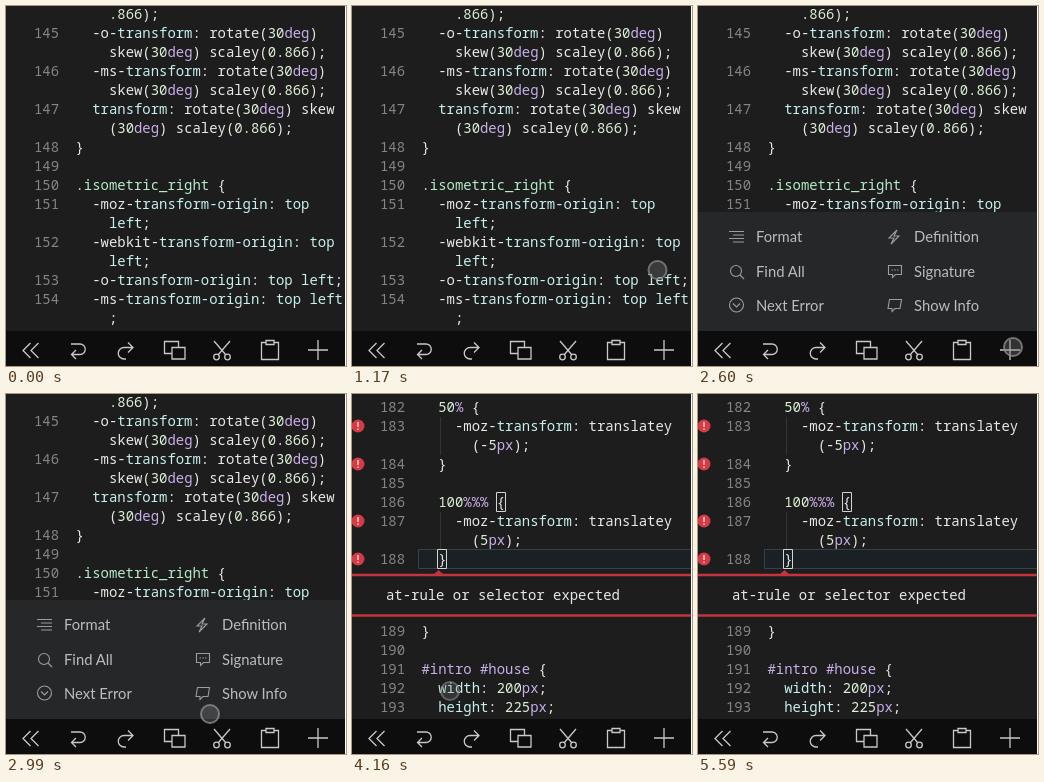
An HTML page that plays this animation: 340 px wide and 360 px high, repeating every 5.72 s.

```html
<!DOCTYPE html>
<html lang="en">
<head>
<meta charset="utf-8">
<title>Mobile code editor</title>
<style>
  html, body { margin: 0; width: 100%; height: 100%; overflow: hidden; background: #fff; }
  svg { display: block; }
  text { white-space: pre; }
  .code { font: 13.93px "Noto Sans Mono", "DejaVu Sans Mono", monospace; fill: #e8e8e6; }
  .num { fill: #858585; }
  .prop { fill: #c6f0ee; }
  .unit { fill: #c9aeea; }
  .class { fill: #b4ecc8; }
  .value { fill: #dcefd6; }
  .label { font: 14.8px Lato, "Open Sans", sans-serif; fill: #bcbcbc; }
  .icon { fill: none; stroke: #c8c8c8; stroke-width: 1.3; }
  .small { stroke: #9c9c9c; stroke-width: 1.1; }
</style>
</head>
<body>
<svg width="340" height="360" viewBox="0 0 340 360">
  <defs>
    <clipPath id="stage"><path d="M0 0h339v360H0z"/></clipPath>
    <clipPath id="above"><path d="M0 0h339v325H0z"/></clipPath>
  </defs>
  <g clip-path="url(#stage)">
    <path fill="#1d1d1d" d="M0 0h339v360H0z"/>

    <g id="before" class="code"></g>

    <g id="after" visibility="hidden">
      <path d="M66.5 155.5H340V174.5H66.5z" fill="#1b2024" stroke="#35424a"/>
      <path d="M88.5 23v38M88.5 118v38" stroke="#343434"/>
      <g id="errors"></g>
      <g id="afterCode" class="code"></g>
      <path d="M144.5 98.500h9v19h-9zM85.500 155.500h9v19h-9z" fill="none" stroke="#d4d4d4"/>
      <path d="M81 181l5.500-5 5.500 5z" fill="#c4343f"/>
      <path d="M0 181H340M0 221.500H340" stroke="#c4343f" stroke-width="2.500"/>
      <text class="code" x="34" y="206">at-rule or selector expected</text>
    </g>

    <g clip-path="url(#above)">
      <g id="menu">
        <path fill="#262728" d="M0 206h339v120H0z"/>
        <g id="labels" class="label"></g>
        <g class="icon small">
          <path d="M31 225.500h15M35 229h11M31 232.500h15M35 236h11"/>
          <path d="M199 224l-8 8h5l-3 6 8-8h-5z"/>
          <circle cx="38" cy="265" r="5.500"/>
          <path d="M42 269l4 4"/>
          <path d="M190.500 259.500h13v9h-6l-3 3v-3h-4zM193.500 264h1.500M196.300 264h1.500M199 264h1.500"/>
          <circle cx="38.500" cy="299" r="7"/>
          <path d="M35 297.500l3.500 3.500 3.500-3.500"/>
          <path d="M191.500 293.500h12l-1.500 9h-5l-3 3v-3h-4z"/>
        </g>
      </g>
    </g>

    <path fill="#0d0d0d" d="M0 325h339v35H0z"/>
    <g class="icon">
      <path d="M24.500 337l-7.500 7.500 7.500 7.500M32.500 337l-7.500 7.500 7.500 7.500"/>
      <path d="M65 338h9a5 5 0 0 1 0 10.500h-8M70 344l-4.500 4.500 4.500 4.500"/>
      <path d="M120 353h-2a5.500 5.500 0 0 1 0-11.500h9M122 336.500l5 5-5 5"/>
      <path d="M166 347.500h-7.500v-12h14v6M166 341.500h13v11.500h-13z"/>
      <path d="M208 335l12 14M224 335l-12 14"/>
      <circle cx="210.500" cy="351" r="2.800"/>
      <circle cx="221.500" cy="351" r="2.800"/>
      <path d="M260 336.500h-4.500v17h17v-17H268M260 334.500h8v4h-8z"/>
      <path d="M302 344h20M312 334v20"/>
    </g>

    <circle id="touch" r="9" fill="#777" fill-opacity=".35" stroke="#8c8c8c" stroke-opacity=".8" stroke-width="2"/>
  </g>
</svg>
<script>
const LOOP = 5720, TICK = 130, JUMP = 3640;
const CHAR = 8.36, LEFT = 69.5, LINE = 19;
const $ = id => document.getElementById(id);

const TOKENS = /(?<unit>#\w+|\b(?:px|deg)|px|deg|%+)|(?<class>\.[a-z]\w+)|(?<value>\.?\d[\d.]*)|(?<prop>transform(?:-origin)?|\b(?:width|height|top|left)\b)/g;

function highlight(code) {
  return code.replace(TOKENS, (match, ...rest) => {
    const groups = rest[rest.length - 1];
    const type = Object.keys(groups).find(key => groups[key]);
    return `<tspan class="${type}">${match}</tspan>`;
  });
}

// Each row is "line number|indent in characters|code".
function rows(source, center) {
  return source.trim().split("\n").map((row, i) => {
    const [num, indent, code] = row.trim().split("|");
    const y = center + i * LINE + 5;
    return `<text class="num" x="28" y="${y}">${num}</text>` +
      `<text x="${LEFT + indent * CHAR}" y="${y}">${highlight(code)}</text>`;
  }).join("");
}

$("before").innerHTML = rows(`
  |4|.866);
  145|2|-o-transform: rotate(30deg)
  |4|skew(30deg) scaley(0.866);
  146|2|-ms-transform: rotate(30deg)
  |4|skew(30deg) scaley(0.866);
  147|2|transform: rotate(30deg) skew
  |4|(30deg) scaley(0.866);
  148|0|}
  149|0|
  150|0|.isometric_right {
  151|2|-moz-transform-origin: top
  |4|left;
  152|2|-webkit-transform-origin: top
  |4|left;
  153|2|-o-transform-origin: top left;
  154|2|-ms-transform-origin: top left
  |4|;`, 8);

$("afterCode").innerHTML = rows(`
  182|2|50% {
  183|4|-moz-transform: translatey
  |6|(-5px);
  184|2|}
  185|0|
  186|2|100%%% {
  187|4|-moz-transform: translatey
  |6|(5px);
  188|2|}`, 13) + rows(`
  189|0|}
  190|0|
  191|0|#intro #house {
  192|2|width: 200px;
  193|2|height: 225px;`, 237);

$("errors").innerHTML = [32, 70, 127, 165].map(y =>
  `<circle cx="6" cy="${y}" r="6.5" fill="#d63a45"/>
   <path d="M6 ${y - 4}v5M6 ${y + 2.5}v1.500" stroke="#f0d0d0" stroke-width="1.5"/>`).join("");

$("labels").innerHTML = [
  ["Format", "Definition"], ["Find All", "Signature"], ["Next Error", "Show Info"]
].map(([a, b], i) => {
  const y = 236 + i * 34.5;
  return `<text x="58" y="${y}">${a}</text><text x="216" y="${y}">${b}</text>`;
}).join("");

// Touch point: time, x, y, opacity.
const PATH = [
  [390, 293, 170, 0], [780, 296, 187, .85], [1560, 315, 341, 1],
  [2600, 315, 341, 1], [3380, 93, 299, 1], [4030, 93, 299, 1],
  [4160, 98, 297, .75], [4550, 106, 292, 0]
];

const smooth = k => k * k * (3 - 2 * k);

function touchAt(t) {
  const next = PATH.findIndex(p => p[0] > t);
  if (next < 1) return PATH[next ? PATH.length - 1 : 0];
  const a = PATH[next - 1], b = PATH[next];
  const k = smooth((t - a[0]) / (b[0] - a[0]));
  return a.map((v, i) => v + (b[i] - v) * k);
}

function draw(now) {
  const t = Math.floor(now % LOOP / TICK) * TICK;
  const jumped = t >= JUMP;
  $("before").setAttribute("visibility", jumped ? "hidden" : "visible");
  $("after").setAttribute("visibility", jumped ? "visible" : "hidden");

  const open = jumped ? 0 : Math.min(1, Math.max(0, (t - 1820) / 390));
  $("menu").setAttribute("transform", `translate(0 ${120 * (1 - open) ** 2})`);
  $("menu").setAttribute("visibility", open ? "visible" : "hidden");

  const [, x, y, alpha] = touchAt(t);
  $("touch").setAttribute("transform", `translate(${x} ${y})`);
  $("touch").setAttribute("opacity", alpha);
}

const start = performance.now();
function frame() {
  draw(performance.now() - start);
  requestAnimationFrame(frame);
}
frame();
</script>
</body>
</html>
```
